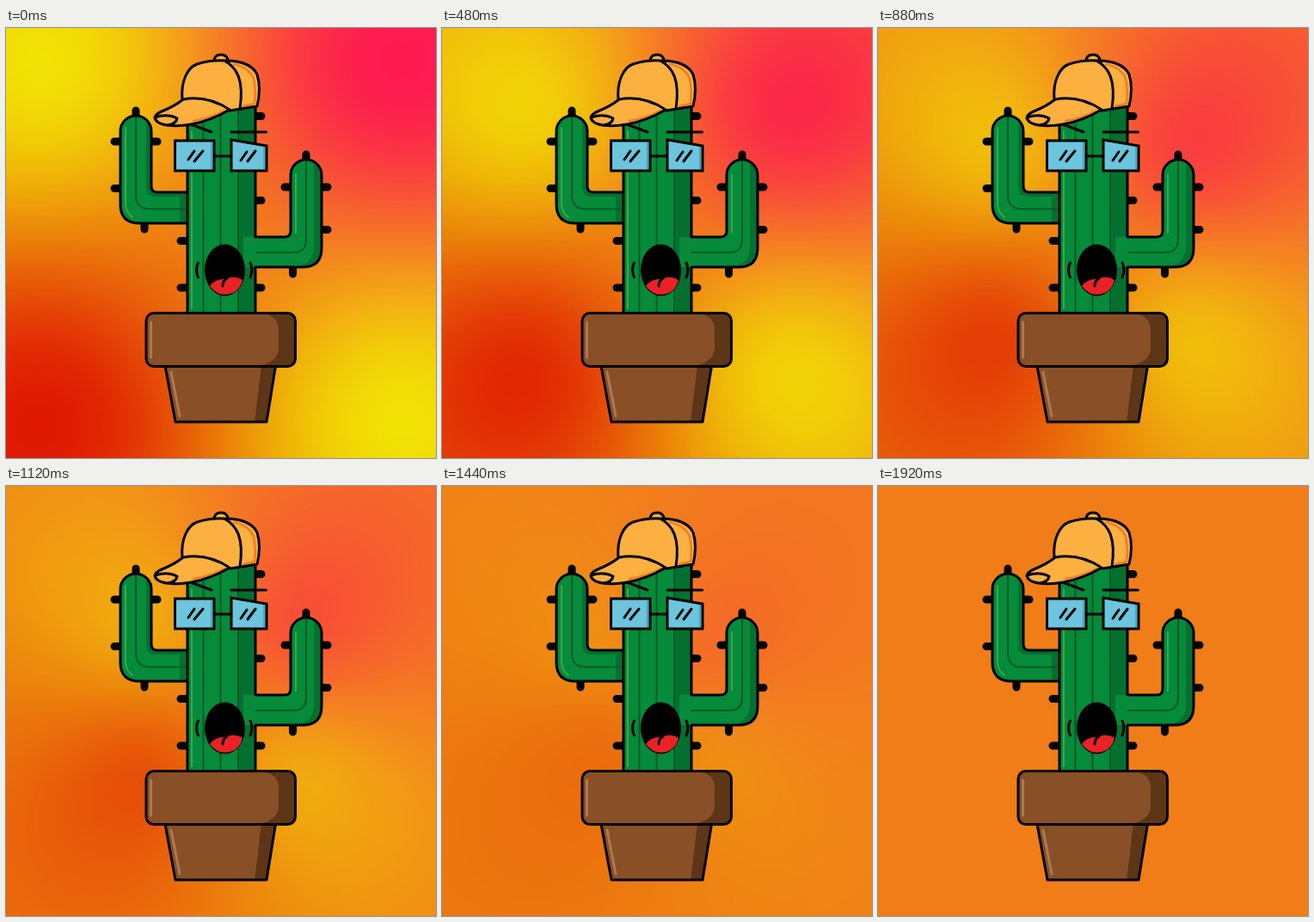
An HTML page with a canvas that plays this animation: 500x500 px, repeating every 2000 ms.

```html
<!DOCTYPE html>
<html lang="en">
<head>
<meta charset="utf-8">
<title>Cactus</title>
<style>
  html, body { margin: 0; width: 100%; height: 100%; overflow: hidden; background: #ef7d16; }
  canvas, svg { position: absolute; inset: 0; width: 100%; height: 100%; display: block; }
  .ink { fill: none; stroke: #000; stroke-width: 3; stroke-linecap: round; stroke-linejoin: round; }
  .spike { fill: none; stroke: #000; stroke-width: 9; stroke-linecap: round; }
  .green { fill: #058b39; }
  .shade { fill: #04702f; }
  .rib { fill: none; stroke: #035a28; stroke-width: 2; }
  .shine { fill: none; stroke: #3ea64c; stroke-width: 2; stroke-linecap: round; }
  .clay { fill: #894f27; }
  .clay-dark { fill: #5c3616; }
  .clay-shine { fill: none; stroke: #aa7a52; stroke-width: 3; stroke-linecap: round; }
  .glass { fill: #6cc5dc; }
  .glass-dark { fill: none; stroke: #4aa5c4; stroke-width: 2; }
  .cloth { fill: #fbb040; }
  .trim { fill: none; stroke: #f47b20; stroke-width: 2.5; stroke-linecap: round; }
</style>
</head>
<body>
<canvas id="sky" width="250" height="250"></canvas>
<svg viewBox="0 0 500 500">
  <!-- spikes -->
  <path class="spike" d="M151 96V104M126 132H136M126 186.500H136M166 132H176M161 224V234
    M203 247.500H213M203 302H213M287 102.500H297M287 200.500H297M287 302H297
    M349 147V156M324 185H334M364 185H374M364 234.500H374M333.500 276V286"/>

  <!-- left arm -->
  <path class="green" d="M212 227H155Q133 227 133 205V120A18 18 0 0 1 169 120V184Q169 191 176 191H212Z"/>
  <path class="shade" d="M163 107Q169 112 169 120V184Q169 191 176 191H212V196H174Q163 196 163 185ZM202 191H212V227H202Z"/>
  <path class="rib" d="M151 103V194Q151 210 166 210.500H211"/>
  <path class="shine" d="M139 116V206Q140 215 147 220"/>
  <path class="ink" d="M212 227H155Q133 227 133 205V120A18 18 0 0 1 169 120V184Q169 191 176 191H212"/>

  <!-- trunk -->
  <path class="green" d="M211 333V90H290V333Z"/>
  <path class="shade" d="M270 90H290V333H270Z"/>
  <path class="rib" d="M229.500 90V333M249.500 90V333M270 90V333"/>
  <path class="shine" d="M216 120V326"/>
  <path class="ink" d="M211 333V100M290 90V333"/>

  <!-- right arm -->
  <path class="green" d="M276 243H324Q331 243 331 236V171A18 18 0 0 1 367 171V256Q367 278 345 278H276Z"/>
  <path class="shade" d="M358 157Q367 162 367 171V256Q367 278 345 278H334Q358 276 358 254Z"/>
  <path class="rib" d="M290 261H334Q349 261 349 246V155"/>
  <path class="shine" d="M337 170V238"/>
  <path class="ink" d="M290 243H324Q331 243 331 236V171A18 18 0 0 1 367 171V256Q367 278 345 278H290"/>

  <!-- pot -->
  <path class="clay" d="M185 393H313.500L303 458H197Z"/>
  <path class="clay-dark" d="M297 393H313.500L303 458H289Z"/>
  <path class="clay-shine" d="M192 400L202 451"/>
  <path class="ink" d="M185 393H313.500L303 458H197Z"/>
  <rect class="clay" x="163" y="331.500" width="173.500" height="62" rx="9"/>
  <path class="clay-dark" d="M298 332H327Q336 332 336 341V384Q336 393 327 393H294Q317 388 317 372V350Q317 335 298 332Z"/>
  <path class="clay-shine" d="M168.500 342V383"/>
  <rect class="ink" x="163" y="331.500" width="173.500" height="62" rx="9"/>

  <!-- mouth -->
  <ellipse cx="254.500" cy="281.500" rx="23.500" ry="30"/>
  <path d="M237 300Q244 291 255 292Q266 287 275 293Q271 309 255 310Q244 310 237 300Z" fill="#ea2227"/>
  <path class="ink" stroke-width="2.500" d="M257 291Q252 294 252 300M223.500 273Q219.500 281 223.500 290M284 273Q288 281 284 290"/>

  <!-- brows and glasses -->
  <path class="ink" d="M215 112L239 121M262 121H302.500"/>
  <path class="glass" d="M196.500 131H242V166H196.500ZM262 130L303 137V166H262Z"/>
  <path class="glass-dark" d="M239 133V164M300 138V164"/>
  <path class="ink" style="stroke-linejoin:miter" d="M196.500 131H242V166H196.500ZM262 130L303 137V166H262ZM242 149H262"/>
  <path class="ink" d="M212 153L219 143M219 155L229 143M273 154L280 144M281 155L290 143"/>

  <!-- cap -->
  <path class="cloth" d="M242 39Q242 31 250 31Q258 31 258 39Z"/>
  <path class="ink" d="M242 39Q242 31 250 31Q258 31 258 39"/>
  <path class="cloth" d="M205 84C203 62 211 46 222 42Q238 37 254 38C271 37 287 43 292 54Q297 70 292 91L261 96Z"/>
  <path class="trim" d="M265 42Q283 46 288 59Q291 73 289 88L276 91"/>
  <path class="ink" d="M205 84C203 62 211 46 222 42Q238 37 254 38C271 37 287 43 292 54Q297 70 292 91L261 96M254 38C268 46 277 59 272 94"/>
  <path class="cloth" d="M173 104Q174 100 181 97Q196 91 206 83Q234 78 260 95Q238 108 215 112Q200 115 187 113Q174 111 173 104Z"/>
  <path class="trim" d="M218 108Q237 105 254 96"/>
  <path class="ink" d="M173 104Q174 100 181 97Q196 91 206 83Q234 78 260 95Q238 108 215 112Q200 115 187 113Q174 111 173 104ZM173 104Q188 99 199 105Q198 112 187 113"/>
</svg>
<script>
  const LOOP = 2000, STEP = 80, MERGE = 1800;
  const SIZE = 250, REACH = 200, SOFT = 100 * 100;
  const spots = [
    { x: -1, y: -1, rgb: [242, 250, 0] },
    { x: 1, y: -1, rgb: [255, 0, 92] },
    { x: -1, y: 1, rgb: [220, 0, 0] },
    { x: 1, y: 1, rgb: [242, 250, 0] }
  ];
  const ctx = document.getElementById("sky").getContext("2d");
  const image = ctx.createImageData(SIZE, SIZE);

  // Blend the four colours by inverse squared distance while they close in on the centre.
  function paint(time) {
    const reach = REACH * Math.max(0, 1 - time / MERGE);
    const data = image.data;
    let i = 0;
    for (let row = 0; row < SIZE; row++) {
      const y = 2 * row + 1 - 250;
      for (let col = 0; col < SIZE; col++) {
        const x = 2 * col + 1 - 250;
        let r = 0, g = 0, b = 0, sum = 0;
        for (const s of spots) {
          const dx = x - s.x * reach, dy = y - s.y * reach;
          const w = 1 / (dx * dx + dy * dy + SOFT);
          r += w * s.rgb[0];
          g += w * s.rgb[1];
          b += w * s.rgb[2];
          sum += w;
        }
        data[i++] = r / sum;
        data[i++] = g / sum;
        data[i++] = b / sum;
        data[i++] = 255;
      }
    }
    ctx.putImageData(image, 0, 0);
  }

  const start = performance.now();
  let shown = -1;
  function tick() {
    const time = (performance.now() - start) % LOOP;
    const step = Math.floor(time / STEP);
    if (step !== shown) {
      shown = step;
      paint(step * STEP);
    }
    requestAnimationFrame(tick);
  }
  tick();
</script>
</body>
</html>
```
